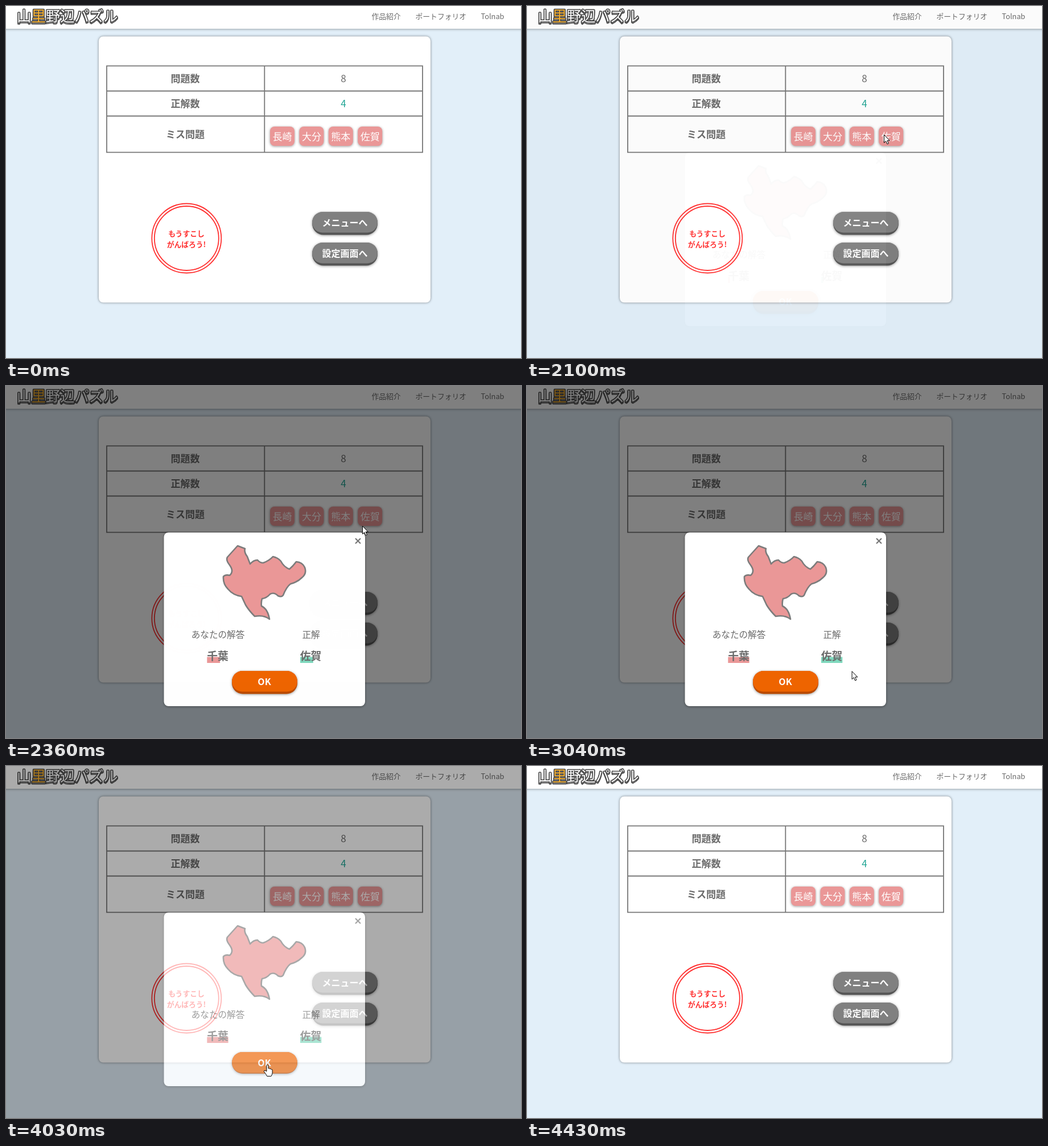
An HTML page that plays this animation: 905 px wide and 619 px high, repeating every 4.83 s.

```html
<!DOCTYPE html>
<html lang="ja">
<head>
<meta charset="utf-8">
<style>
  html, body { margin: 0; width: 100%; height: 100%; overflow: hidden; background: #e2eff9; }
  svg { display: block; width: 100vw; height: 100vh; }
  text { font: 17px "Noto Sans CJK JP", "Noto Sans CJK", sans-serif; fill: #6b6b6b; text-anchor: middle; }
  .bold { font-weight: 700; }
  .nav text { font-size: 12.8px; font-weight: 500; }
  .logo text { font-size: 25.4px; font-weight: 500; text-anchor: start; fill: #fff;
    stroke: #4a4a4a; stroke-width: 3.2; stroke-linejoin: round; paint-order: stroke; }
  .logo .gold { fill: #fbb32f; }
  .header { filter: drop-shadow(0 1px 2px #0005); }
  .card { filter: drop-shadow(0 0 2px #0007); }
  .glow { filter: drop-shadow(0 1px 2px #0006); }
  .tag rect { fill: #ea9797; }
  .tag text, .button text { fill: #fff; }
  .button text { font-size: 16px; font-weight: 700; }
  .stamp circle { fill: none; stroke: #ff3030; stroke-width: 1.8; }
  .stamp text { fill: #ff3030; font-size: 12.8px; font-weight: 700; }
  .label { font-size: 15.6px; }
  .answer { font-size: 18.8px; font-weight: 700; }
</style>
</head>
<body>
<svg viewBox="0 0 905 619" preserveAspectRatio="none">
  <rect width="905" height="619" fill="#e2eff9"/>
  <rect class="header" x="-5" y="-5" width="915" height="45" fill="#fff"/>
  <g class="logo">
    <text x="19" y="28.5">山里野辺パズル</text>
    <text x="19" y="26.5">山<tspan class="gold">里</tspan>野辺パズル</text>
  </g>
  <g class="nav">
    <text x="668" y="22.7">作品紹介</text>
    <text x="764.3" y="22.7">ポートフォリオ</text>
    <text x="855" y="22.7">Tolnab</text>
  </g>

  <rect class="card" x="163" y="53.5" width="583" height="468" rx="8" fill="#fff"/>
  <path d="M177 105.3H732V257.3H177ZM177 149.5H732M177 193.5H732M454.3 105V257" fill="none" stroke="#777" stroke-width="1.8"/>
  <text class="bold" x="315" y="134.3">問題数</text>
  <text class="bold" x="315" y="178.3">正解数</text>
  <text class="bold" x="315" y="232.3">ミス問題</text>
  <text x="593" y="134.3">8</text>
  <text x="593" y="178.3" style="fill:#20a594">4</text>
  <g id="tags"></g>

  <g class="stamp">
    <circle cx="317.3" cy="408.5" r="61"/>
    <circle cx="317.3" cy="408.5" r="56.5"/>
    <text x="317" y="405">もうすこし</text>
    <text x="317" y="423.5">がんばろう!</text>
  </g>
  <g class="button glow">
    <rect x="538" y="362" width="115" height="40.5" rx="20" fill="#555"/>
    <rect x="538" y="362" width="115" height="36.5" rx="18.2" fill="#808080"/>
    <text x="595.5" y="386.5">メニューへ</text>
  </g>
  <g class="button glow">
    <rect x="538" y="416" width="115" height="40.5" rx="20" fill="#555"/>
    <rect x="538" y="416" width="115" height="36.5" rx="18.2" fill="#808080"/>
    <text x="595.5" y="440.5">設定画面へ</text>
  </g>

  <g id="modal">
    <rect width="905" height="619" opacity=".5"/>
    <rect class="glow" x="277.5" y="257.5" width="353.5" height="305.5" rx="8" fill="#fff"/>
    <path d="M614 268l9 9m0-9l-9 9" stroke="#777" stroke-width="2.2"/>
    <path fill="#ea9797" stroke="#7c7c7c" stroke-width="2.6" stroke-linejoin="round"
      d="M407 281L420 286Q418 292 424 300L429 313Q435 306 442 306Q446 311 452 311Q463 307 469 300Q478 302 483 308Q488 318 498 322
         Q504 317 510 309Q521 310 525 319Q529 330 520 337Q512 345 500 348Q493 353 487 368Q484 372 478 369Q471 362 464 366
         Q458 373 450 374Q448 380 449 387Q460 392 463 410Q453 402 437 405Q427 395 421 385L414 370Q399 368 390 357
         Q381 348 382 335Q386 331 393 333Q401 326 393 315Q386 306 389 301Z"/>
    <text class="label" x="372.5" y="442.7">あなたの解答</text>
    <text class="label" x="536" y="442.7">正解</text>
    <rect class="marker" x="353.3" y="476.5" height="10.5" fill="#ea9797"/>
    <rect class="marker" x="517" y="476.5" height="10.5" fill="#7fd8bd"/>
    <text class="answer" x="372" y="482">千葉</text>
    <text class="answer" x="535.5" y="482">佐賀</text>
    <g class="button glow">
      <rect id="okBase" x="397" width="115" rx="19" fill="#b94a00"/>
      <g id="okFace">
        <rect x="397" y="501" width="115" height="36.5" rx="18.2" fill="#ee6400"/>
        <text x="454" y="525.5">OK</text>
      </g>
    </g>
  </g>

  <g id="cursor" fill="#fff" stroke="#000" stroke-linejoin="round">
    <path id="arrow" d="M.5 .5V14.5L3.7 11.5 6 16.8 8.4 15.8 6.1 10.7H10.3Z"/>
    <path id="hand" d="M-1.6 11V1Q-1.4-.4 0-.4T1.6 1V6Q3 5 4.2 6.7Q5.8 5.8 6.8 7.5Q8.6 7 8.6 9.5V14Q8 17 6.5 19.5H-.8Q-2.6 15.5-6 11.6Q-6.6 9.4-4.4 9.3Z"/>
  </g>
</svg>
<script>
const LOOP = 4830;
const $ = id => document.getElementById(id);
const clamp = v => Math.max(0, Math.min(1, v));

// time, x, y of the pointer tip
const route = [
  [490, 871, 610], [600, 819, 538], [700, 762, 460], [800, 712, 395], [910, 668.5, 354], [1000, 630, 329],
  [1180, 608, 291], [1330, 601, 260], [1540, 617, 231], [1730, 627, 226], [2240, 627, 226],
  [2490, 625, 267], [2650, 609, 350], [2840, 586, 448], [3040, 571, 501], [3160, 522, 523],
  [3350, 459.5, 526], [4080, 459.5, 526], [4200, 555, 552], [4360, 744, 609], [4430, 762, 619]
];

function pointerAt(t) {
  const i = route.findIndex(p => p[0] > t);
  const [t0, x0, y0] = route[i - 1], [t1, x1, y1] = route[i];
  const k = (t - t0) / (t1 - t0);
  return [x0 + (x1 - x0) * k, y0 + (y1 - y0) * k];
}

// CSS "ease": cubic-bezier(.25, .1, .25, 1), solved by bisection
function ease(x) {
  x = clamp(x);
  const bezier = (s, a, b) => 3 * s * (1 - s) ** 2 * a + 3 * s * s * (1 - s) * b + s ** 3;
  let low = 0, high = 1;
  for (let i = 0; i < 20; i++) {
    const mid = (low + high) / 2;
    if (bezier(mid, .25, .25) < x) low = mid; else high = mid;
  }
  return bezier(low, .1, 1);
}

$('tags').innerHTML = ['長崎', '大分', '熊本', '佐賀'].map((name, i) =>
  `<g class="tag" transform="translate(${464 + i * 51.4} 212)">
    <rect class="glow" width="43" height="34" rx="8"/><text x="21.5" y="23.8">${name}</text></g>`).join('');

function draw(t) {
  const shown = ease((t - 2086) / 300) - ease((t - 3965) / 300);
  $('modal').setAttribute('opacity', shown);
  $('modal').style.display = shown > 0 ? '' : 'none';
  document.querySelectorAll('.marker').forEach(m => m.setAttribute('width', 37.3 * clamp((t - 2055) / 500)));

  const hover = t >= 3190 && t < 4150;
  $('okBase').setAttribute('y', hover ? 503 : 501);
  $('okBase').setAttribute('height', hover ? 38 : 40.5);
  $('okFace').setAttribute('transform', `translate(0 ${hover ? 2 : 0})`);

  const visible = t >= 490 && t < 4430;
  $('cursor').style.display = visible ? '' : 'none';
  if (visible) $('cursor').setAttribute('transform', `translate(${pointerAt(t)})`);
  $('arrow').style.display = hover ? 'none' : '';
  $('hand').style.display = hover ? '' : 'none';
}

const start = performance.now();
(function tick() {
  draw((performance.now() - start) % LOOP);
  requestAnimationFrame(tick);
})();
</script>
</body>
</html>
```
